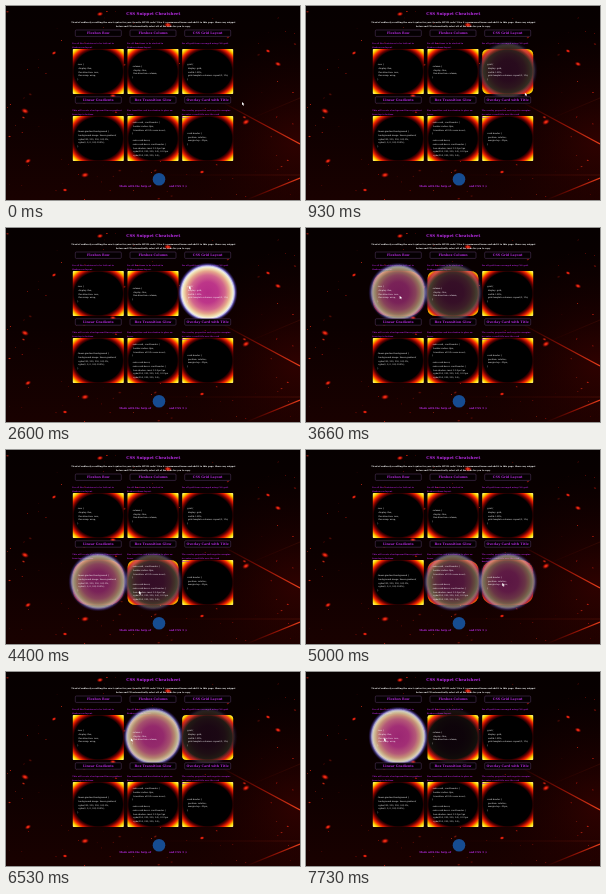
Animation, 294 px wide and 194 px high, one loop 8 s. Source, as an HTML page with a canvas:

```html
<!DOCTYPE html>
<html lang="en">
<head>
<meta charset="utf-8">
<title>CSS Snippet Cheatsheet</title>
<style>
html, body { margin: 0; width: 100%; height: 100%; overflow: hidden; background: #080000; }
canvas { display: block; }
</style>
</head>
<body>
<canvas id="stage" width="294" height="194"></canvas>
<script>
const W = 294, H = 194, LOOP = 8000, FADE = 420, CARD_W = 51, CARD_H = 45;
const SERIF = '"DejaVu Serif", serif', PURPLE = '#b52be0';
const stage = document.getElementById('stage');
let ctx = stage.getContext('2d');

const cards = [
  { title: 'Flexbox Row', note: ['For all flex containers to be laid out in', 'flexbox row layout.'],
    code: ['.row {', '  display: flex;', '  flex-direction: row;', '  flex-wrap: wrap;', '}'] },
  { title: 'Flexbox Column', note: ['For all flex items to be stacked in', 'flexbox column layout.'],
    code: ['.column {', '  display: flex;', '  flex-direction: column;', '}'] },
  { title: 'CSS Grid Layout', note: ['For all grid items arranged using CSS grid.'],
    code: ['.grid {', '  display: grid;', '  width: 100%;', '  grid-template-columns: repeat(2, 1fr);', '}'] },
  { title: 'Linear Gradients', note: ['This will create a background linear gradient', 'from top to bottom.'],
    code: ['.linear-gradient-background {', '  background-image: linear-gradient(', '  rgba(255, 255, 255, 0.8) 0%,', '  rgba(0, 0, 0, 0.8) 100%);', '}'] },
  { title: 'Box Transition Glow', note: ['Box transition and box shadow to glow on', 'hover.'],
    code: ['.code-card, .card-header {', '  border-radius: 8px;', '  transition: all 0.2s ease-in-out;', '}', '', '.code-card:hover,', '.code-card:hover .card-header {', '  box-shadow: inset 0 0 5px 5px', '  rgba(255, 255, 255, 0.5), 0 0 5px', '  rgba(255, 255, 255, 0.5);'] },
  { title: 'Overlay Card with Title', note: ['The overlay properties and negative margins', 'to center a card title over the card', 'border.'],
    code: ['.card-header {', '  position: relative;', '  margin-top: -30px;', '}'] }
].map((card, i) => ({
  ...card, x: 92.3 + (i % 3) * 54.7, y: i < 3 ? 65.5 : 132.5, head: i < 3 ? 24 : 90.8
}));

// Pointer stops: time, x, y.
const pointerPath = [
  [0, 236, 96], [400, 236, 96], [1000, 214, 84], [1600, 208, 63], [2600, 183, 58],
  [3000, 150, 64], [3660, 88, 68], [4000, 88, 120], [4400, 133, 141],
  [4750, 170, 138], [5150, 212, 130], [5350, 232, 108], [5730, 205, 84],
  [6100, 178, 68], [6500, 120, 66], [6860, 78, 66], [LOOP, 78, 66]
];

const mix = (a, b, p) => a + (b - a) * p;

function pointerAt(t) {
  const i = Math.max(1, pointerPath.findIndex(stop => stop[0] > t));
  const [t0, x0, y0] = pointerPath[i - 1], [t1, x1, y1] = pointerPath[i];
  const p = Math.max(0, (t - t0) / (t1 - t0));
  return { x: mix(x0, x1, p), y: mix(y0, y1, p) };
}

// Share of the last FADE ms that the pointer spent on the card.
function hoverAmount(card, t) {
  const samples = 14;
  let inside = 0;
  for (let k = 0; k < samples; k++) {
    const { x, y } = pointerAt(t - k * FADE / samples);
    inside += Math.abs(x - card.x) < CARD_W / 2 && Math.abs(y - card.y) < CARD_H / 2;
  }
  return inside / samples;
}

function addStops(gradient, stops) {
  stops.forEach(([at, color]) => gradient.addColorStop(at, color));
  return gradient;
}

const radial = (x, y, r, stops) => addStops(ctx.createRadialGradient(x, y, 0, x, y, r), stops);

function text(s, x, y, size, color, align = 'left', weight = 'normal') {
  ctx.font = `${weight} ${size}px ${SERIF}`;
  ctx.fillStyle = color;
  ctx.textAlign = align;
  ctx.fillText(s, x, y);
}

function streak(x1, y1, x2, y2, width, alpha) {
  ctx.strokeStyle = addStops(ctx.createLinearGradient(x1, y1, x2, y2), [
    [0, 'rgba(150,10,0,0)'], [0.5, `rgba(190,22,6,${alpha * 0.7})`], [1, `rgba(255,70,30,${alpha})`]
  ]);
  ctx.lineWidth = width;
  ctx.beginPath();
  ctx.moveTo(x1, y1);
  ctx.lineTo(x2, y2);
  ctx.stroke();
}

function ember(x, y, size, angle, alpha) {
  ctx.save();
  ctx.translate(x, y);
  ctx.rotate(angle);
  ctx.scale(1.5, 1);
  ctx.fillStyle = radial(0, 0, size * 2, [
    [0, `rgba(255,75,35,${alpha})`], [0.35, `rgba(225,30,12,${alpha})`], [1, 'rgba(120,0,0,0)']
  ]);
  ctx.fillRect(-size * 2, -size * 2, size * 4, size * 4);
  ctx.restore();
}

function background() {
  ctx.fillStyle = addStops(ctx.createLinearGradient(0, 0, 0, H), [[0, '#060000'], [0.5, '#0b0000'], [1, '#190100']]);
  ctx.fillRect(0, 0, W, H);
  ctx.fillStyle = radial(290, 135, 115, [[0, 'rgba(75,3,0,.5)'], [1, 'rgba(35,0,0,0)']]);
  ctx.fillRect(0, 0, W, H);
  streak(214, 95, 294, 138, 1.2, 0.9);
  streak(240, 194, 294, 172, 1.2, 0.9);
  streak(140, 169, 294, 169, 0.6, 0.25);
  streak(232, 118, 294, 92, 0.5, 0.2);
  let seed = 718;
  const rand = () => (seed = (seed * 16807) % 2147483647) / 2147483647;
  for (let i = 0; i < 130; i++) {
    ember(rand() * W, rand() ** 0.8 * H, 0.25 + rand() ** 3 * 0.55, -0.6 + rand(), 0.2 + rand() * 0.5);
  }
  [[48, 47], [94, 8], [162, 19], [262, 45], [22, 155], [79, 169], [59, 184], [272, 58], [240, 116], [196, 166], [107, 90], [19, 105]]
    .forEach(([x, y], i) => ember(x, y, 0.9 + (i % 3) * 0.25, -0.5 + i % 4 * 0.3, 0.95));
}

const restStops = [[0, '#000'], [0.67, '#000'], [0.74, '#6a0000'], [0.82, '#f02000'], [0.91, '#ffd800'], [1, '#ffffa0']];
const discStops = [
  [0, '#b52c86'], [0.35, '#bd3689'], [0.58, '#d2668c'], [0.71, '#e5a58c'], [0.79, '#efd9a9'],
  [0.85, '#f2efe0'], [0.89, '#b9b4ee'], [0.94, 'rgba(92,78,190,.6)'], [1, 'rgba(50,30,120,0)']
];

function drawCard({ title, note, code, x, y, head }, lit) {
  ctx.save();
  ctx.translate(x, y);
  ctx.scale(1, CARD_H / CARD_W);
  ctx.fillStyle = radial(0, 0, CARD_W / Math.SQRT2, restStops);
  ctx.beginPath();
  ctx.roundRect(-CARD_W / 2, -CARD_W / 2, CARD_W, CARD_W, mix(0.8, CARD_W / 2, lit));
  ctx.fill();
  ctx.restore();

  ctx.fillStyle = '#050002';
  ctx.strokeStyle = '#6d4a80';
  ctx.lineWidth = 0.4;
  ctx.beginPath();
  ctx.roundRect(x - 23, head, 46, 6.4, 1);
  ctx.fill();
  ctx.stroke();
  text(title, x, head + 4.4, 3.25, PURPLE, 'center', 'bold');
  note.forEach((line, i) => text(line, x - 26, head + 14 + i * 3.7, 1.95, '#a01fc4', 'left', 'bold'));

  ctx.globalAlpha = lit;
  ctx.fillStyle = radial(x, y - 1, 30, discStops);
  ctx.fillRect(x - 30, y - 31, 60, 60);
  ctx.globalAlpha = 1;
  const first = y - code.length * 1.8 + 2.9;
  code.forEach((line, i) => text(line, x - 21, first + i * 3.6, 2.1, '#fff'));
}

const arrow = new Path2D('M0 0V3.2L.8 2.5 1.4 3.7 2 3.4 1.4 2.3H2.4Z');

function drawCursor({ x, y }) {
  ctx.save();
  ctx.translate(x, y);
  ctx.fillStyle = '#fff';
  ctx.fill(arrow);
  ctx.restore();
}

// The backdrop never moves, so it is painted once.
const backdrop = new OffscreenCanvas(W, H), stageCtx = ctx;
ctx = backdrop.getContext('2d');
background();
ctx = stageCtx;

function draw(now) {
  const t = now % LOOP, step = 200 / 3;
  const shown = t < 400 ? 0 : Math.min(6860, 400 + Math.floor((t - 400) / step) * step);
  ctx.drawImage(backdrop, 0, 0);
  text('CSS Snippet Cheatsheet', 147.3, 8.6, 4, PURPLE, 'center', 'bold');
  text('Tired of endlessly recalling the exact syntax for your favorite HTML code? Give it a permanent home and add it to this page. Share any snippet', 147.4, 16.6, 2.06, '#fff', 'center', 'bold');
  text("below and I'll automatically select all of the code for you to copy.", 147.4, 20.6, 2.06, '#fff', 'center', 'bold');
  cards.forEach(card => drawCard(card, hoverAmount(card, shown)));
  text('Made with the help of', 145, 181, 2.6, PURPLE, 'right', 'bold');
  text('and CSS 3 :)', 163, 181, 2.6, PURPLE, 'left', 'bold');
  ctx.fillStyle = '#164c91';
  ctx.beginPath();
  ctx.arc(153, 173.3, 6.3, 0, 7);
  ctx.fill();
  drawCursor(pointerAt(shown));
}

function frame(now) {
  draw(now);
  requestAnimationFrame(frame);
}
draw(0);
requestAnimationFrame(frame);
</script>
</body>
</html>
```
